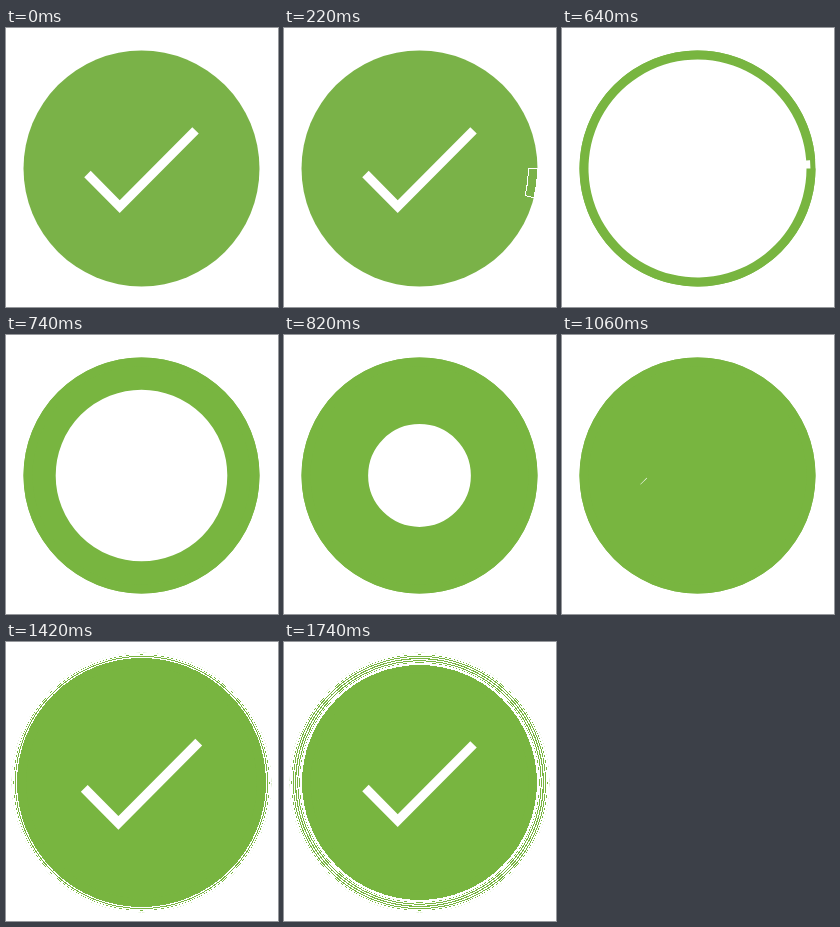
An HTML page for the animation above (1880 ms loop, 272 px wide and 279 px high).

```html
<!DOCTYPE html>
<html lang="en">
<head>
<meta charset="utf-8">
<title>Success check</title>
<style>
  html, body { margin: 0; width: 100%; height: 100%; overflow: hidden; background: #fff; }
  svg { display: block; width: 100%; height: 100%; }
</style>
</head>
<body>
<svg viewBox="0 0 272 279">
  <g id="badge" fill="none" stroke-miterlimit="10">
    <circle id="disc" r="118"/>
    <circle id="fill"/>
    <path id="ring"/>
    <path id="check" d="M-11.9 1.2l7.1 7.2 16.7-16.8" transform="scale(4.54)"
      stroke="#fff" stroke-width="2" stroke-dasharray="48 60"/>
  </g>
  <path id="trails" fill="none" stroke="#fff" stroke-width="1.1" shape-rendering="crispEdges"
    transform="translate(135.5 140.5)"/>
</svg>
<script>
const LOOP = 1880, STEP = 20, START = 80, SLOWDOWN = 1.2;
const CLEAR = 560, PEAK = 1340, SETTLED = 1540;
const R = 118, INNER = 109, SPREAD = 126, DASH = 168;
const OLD_GREEN = '#7ab248', GREEN = '#78b540';

const el = id => document.getElementById(id);
const [badge, disc, fill, ring, check, trails] =
  ['badge', 'disc', 'fill', 'ring', 'check', 'trails'].map(el);
const clamp = v => Math.min(1, Math.max(0, v));
const set = (node, attrs) => {
  for (const k in attrs) node.setAttribute(k, attrs[k]);
};

// CSS-like cubic-bezier(x1, 0, x2, 1)
const bezier = (x1, x2) => x => {
  let lo = 0, hi = 1;
  for (let i = 0; i < 24; i++) {
    const s = (lo + hi) / 2, r = 1 - s;
    if (3 * s * r * r * x1 + 3 * s * s * r * x2 + s * s * s < x) lo = s;
    else hi = s;
  }
  return lo * lo * (3 - 2 * lo);
};
const strokeEase = bezier(0.65, 0.45);
const easeInOut = bezier(0.42, 0.58);

const clock = t => (t - START) / SLOWDOWN;
const phase = (t, delay, length) => clamp((clock(t) - delay) / length);

function scaleAt(t) {
  const p = 2 * phase(t, 900, 300);
  return 1 + 0.1 * easeInOut(p < 1 ? p : 2 - p);
}

const circlePath = r => `M${r} 0A${r} ${r} 0 1 1 ${-r} 0A${r} ${r} 0 1 1 ${r} 0Z`;

function arcBand(angle) {
  if (angle <= 0) return '';
  if (angle >= 2 * Math.PI) return circlePath(R) + circlePath(INNER);
  const c = Math.cos(angle), s = Math.sin(angle), big = angle > Math.PI ? 1 : 0;
  return `M${R} 0A${R} ${R} 0 ${big} 1 ${R * c} ${R * s}` +
    `L${INNER * c} ${INNER * s}A${INNER} ${INNER} 0 ${big} 0 ${INNER} 0Z`;
}

// Thin edges left behind while the badge shrinks back
function shrinkTrails(t) {
  let d = '';
  for (let k = PEAK + STEP; k <= Math.min(t, SETTLED); k += STEP) d += circlePath(R * scaleAt(k));
  return d;
}

function draw(t) {
  const cleared = t >= CLEAR;
  const shrinking = t > PEAK;
  const scale = scaleAt(t);
  const depth = SPREAD * easeInOut(phase(t, 410, 400));
  const width = cleared ? Math.min(R, depth) : 0;
  const sweep = DASH * strokeEase(phase(t, 0, 600)) / 25;

  set(badge, { transform: `translate(135.5 140.5) scale(${scale})` });
  set(disc, {
    fill: cleared ? (shrinking ? GREEN : 'none') : OLD_GREEN,
    r: shrinking ? R * 1.1 / scale : R
  });
  set(fill, {
    r: width >= R ? R : R - width / 2,
    fill: width >= R ? GREEN : 'none',
    stroke: width > 0 && width < R ? GREEN : 'none',
    'stroke-width': width
  });
  set(ring, {
    d: arcBand(sweep),
    fill: cleared ? GREEN : OLD_GREEN,
    'fill-rule': 'evenodd',
    stroke: cleared ? 'none' : '#fff',
    'shape-rendering': cleared ? 'auto' : 'crispEdges'
  });
  const drawn = cleared ? strokeEase(phase(t, 800, 300)) : 1;
  set(check, {
    'stroke-dashoffset': 48 * (1 - drawn),
    visibility: drawn > 0 ? 'visible' : 'hidden'
  });
  set(trails, { d: shrinkTrails(t) });
}

const begin = performance.now();
function tick() {
  const t = (performance.now() - begin) % LOOP;
  draw(Math.floor(t / STEP) * STEP);
  requestAnimationFrame(tick);
}
draw(0);
requestAnimationFrame(tick);
</script>
</body>
</html>
```
